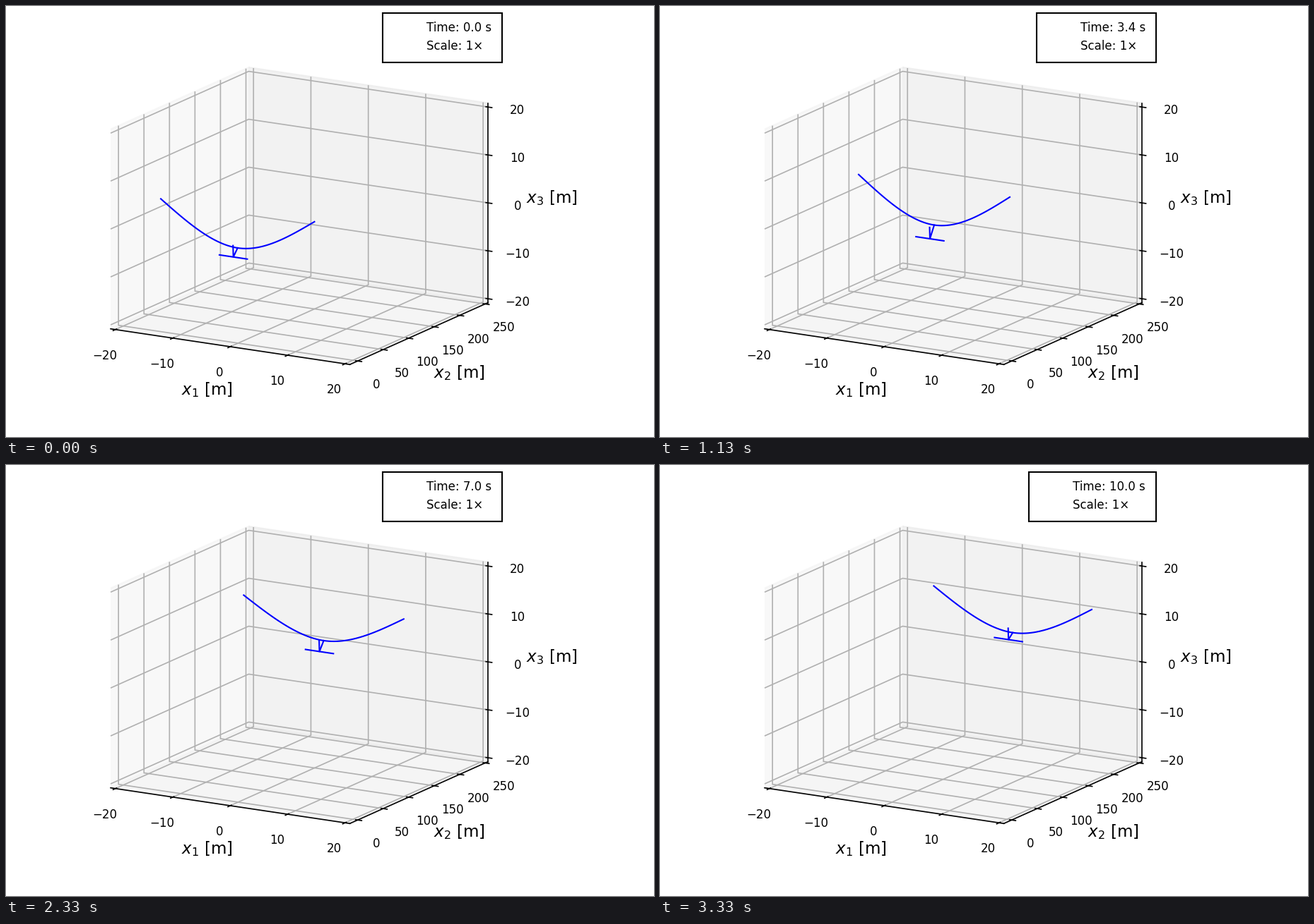
A matplotlib script for the animation above (3.36 s loop, 917 by 611 pixels).

```python
import matplotlib.pyplot as plt
import numpy as np
from matplotlib.animation import FuncAnimation
from matplotlib.collections import LineCollection
from matplotlib.patches import Polygon, Rectangle

W, H, DPI = 917, 611, 96
LOOP, TICK = 3360, 10  # ms
PX = 72 / DPI  # points per pixel
THIN, THICK = 1.667 * PX, 2.083 * PX
SMALL, LARGE = 16.667 * PX, 22.917 * PX
plt.rcParams["font.family"] = "DejaVu Sans"

# Orthographic view: centre and range of the data, each axis as a screen vector
MIDDLE = np.array([0, 120, 0])
RANGE = np.array([40, 260, 40]) * 25 / 24
EDGES = np.array([[338.5, 50.58], [195.4, -87.6], [0, -283.1]])
CENTRE = np.array([415, 297.6])


def project(*xyz):
    """Screen pixels of data points."""
    points = np.stack(np.broadcast_arrays(*xyz), axis=-1)
    return (points - MIDDLE) / RANGE @ EDGES + CENTRE


fig = plt.figure(figsize=(W / DPI, H / DPI), dpi=DPI, facecolor="white")
ax = fig.add_axes([0, 0, 1, 1])
ax.set_xlim(0, W)
ax.set_ylim(H, 0)
ax.axis("off")

x0, y0, z0 = MIDDLE - RANGE / 2
x1, y1, z1 = MIDDLE + RANGE / 2

# Walls and floor
panes = [
    (0.95, project(x0, [y0, y1, y1, y0], [z0, z0, z1, z1])),
    (0.90, project([x0, x1, x1, x0], y1, [z0, z0, z1, z1])),
    (0.925, project([x0, x1, x1, x0], [y0, y0, y1, y1], z0)),
]
for grey, corners in panes:
    ax.add_patch(Polygon(corners, closed=False, lw=THICK,
                         color=(grey, grey, grey, 0.5)))

x_ticks = z_ticks = range(-20, 21, 10)
y_ticks = range(0, 251, 50)

# Grid: every line bends once where two panes meet
grid = [project(x, [y1, y1, y0], [z1, z0, z0]) for x in x_ticks]
grid += [project([x0, x0, x1], y, [z1, z0, z0]) for y in y_ticks]
grid += [project([x0, x0, x1], [y0, y1, y1], z) for z in z_ticks]
ax.add_collection(LineCollection(grid, colors="#b0b0b0", linewidths=THIN,
                                 zorder=1.5))

# Axis lines, ticks and labels; offsets point away from the box
ux, uy, uz = EDGES / 12
strokes = [
    project([x0, x1], y0, z0),
    project(x1, [y0, y1], z0),
    project(x1, y1, [z0, z1]),
]
axes = [
    (x_ticks, lambda v: project(v, y0, z0), -uy, -uy - uz),
    (y_ticks, lambda v: project(x1, v, z0), ux, ux - uz),
    (z_ticks, lambda v: project(x1, y1, v), ux, ux + uy),
]
for values, place, outward, away in axes:
    for v in values:
        p = place(v)
        strokes.append(np.array([p - 0.1 * outward, p + 0.2 * outward]))
        x, y = p + 0.9375 * away
        ax.text(x, y - 1, str(v).replace("-", "\u2212"),
                size=SMALL, ha="center", va="top")
ax.add_collection(LineCollection(strokes, colors="black", linewidths=THIN,
                                 capstyle="projecting", zorder=2))

for i, (x, y) in enumerate([(284.7, 544.2), (641.5, 519.8), (772, 272)], 1):
    ax.text(x, y, f"$x_{i}$ [m]", size=LARGE, ha="center", va="center")

# Legend box
box = ax.add_patch(Rectangle((533, 10), 169, 70, fc="white", ec="black",
                             lw=THICK, zorder=2))
clock = ax.text(595, 36, "", size=SMALL)
scale = ax.text(595, 62, "Scale: 1\u00d7", size=SMALL)

TAIL_ARM, TAIL_HALF, FIN = 8.4, 2.43, 2.4
span = np.linspace(-1, 1, 61)
bend = (3 * span**2 - np.abs(span) ** 3) / 2  # cantilever with a tip load

wing, tail, body = (ax.plot([], [], color="blue", lw=THICK, zorder=2.5)[0]
                    for _ in range(3))


def step_up(t, mid, width):
    """Smooth step from 0 to 1."""
    return 1 / (1 + np.exp((mid - t) / width))


def since(t, start):
    """Squared time after start, 0 before it."""
    return max(t - start, 0) ** 2


def flight(t):
    """Distance, heights of wing root and tail, and wing flex in a gust."""
    y = -0.9 + 25 * t - 0.128 * t * t / (1 + 0.003 * t)
    root = -0.93 + 5.95 * step_up(t, 4.6, 0.65) - 0.24 * since(t, 7.3)
    lift = np.exp(-np.exp((4.55 - t) / 0.88))  # the tail follows late
    tail_z = -2.41 - 0.1 * t + 6.5 * lift - 0.215 * since(t, 8)
    flex = (0.4 * np.exp(-(((t - 3.8) / 0.9) ** 2))
            - 0.87 * step_up(t, 5.5, 0.35) + 0.04 * since(t, 7.3))
    return y, root, tail_z, flex


def update(frame):
    t = int((frame + 0.5) * 3 / 10) / 10  # thirty pictures a second
    y, z, tail_z, flex = flight(t)
    tail_y = y - TAIL_ARM
    half, rise = 13.38 - 0.65 * flex, 7.86 + flex
    wing.set_data(*project(half * span, y, z + rise * bend).T)
    tail.set_data(*project([-TAIL_HALF, TAIL_HALF], tail_y, tail_z).T)
    body.set_data(*project(0, [tail_y - 0.6, tail_y, y],
                           [tail_z + FIN, tail_z, z]).T)

    # The box grows to the left for a longer time
    shift = 11 if t >= 10 else 0
    box.set_bounds(533 - shift, 10, 169 + shift, 70)
    clock.set_x(595 - shift)
    scale.set_x(595 - shift)
    clock.set_text(f"Time: {t:.1f} s")
    return wing, tail, body, box, clock, scale


anim = FuncAnimation(fig, update, frames=LOOP // TICK, interval=TICK,
                     repeat=True, repeat_delay=0, cache_frame_data=False)
plt.show()
```
